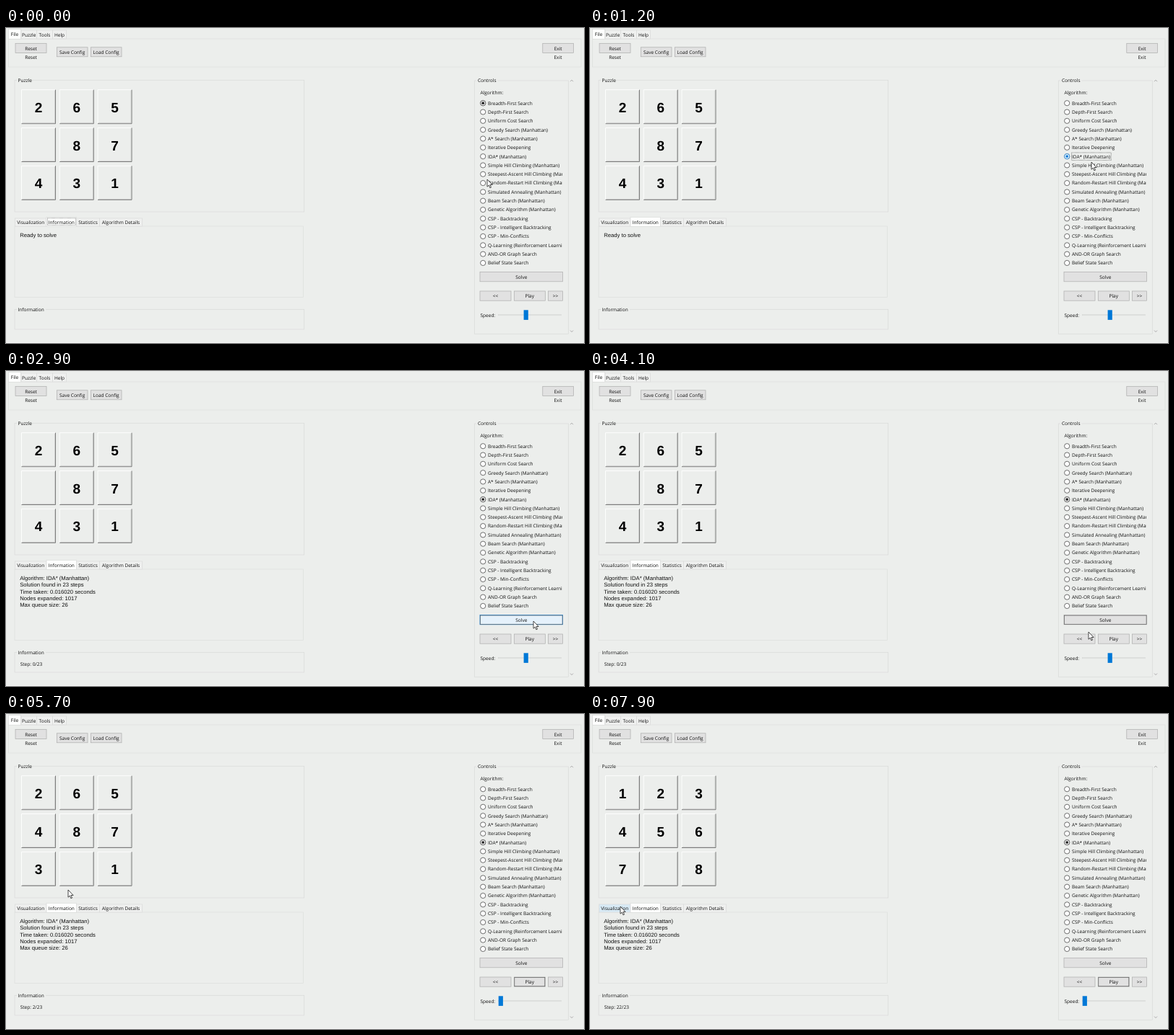
Recreate the animation shown at these times as an HTML page. Size 800 px wide and 437 px high, loop 8 s.

```html
<!DOCTYPE html>
<html lang="en">
<head>
<meta charset="utf-8">
<title>Puzzle solver</title>
<style>
  html, body { margin: 0; width: 100%; height: 100%; overflow: hidden; background: #eceeec; }
  svg { display: block; width: 100vw; height: 100vh; }
  text { font: 6.52px "Open Sans", "Noto Sans", sans-serif; fill: #111; text-rendering: geometricPrecision; white-space: pre; }
  .log { font: 7.68px "Liberation Sans", Arial, sans-serif; }
  .digit { font: bold 19px "Liberation Sans", Arial, sans-serif; fill: #000; }
</style>
</head>
<body>
<svg id="stage" viewBox="0 0 800 437">
  <defs><clipPath id="panel"><rect x="650" y="80" width="120" height="260"/></clipPath></defs>
</svg>
<script>
const LOOP = 8000, TICK = 100;
const SELECT = 1000, SOLVE = 2300, SOLVED = 2400, PLAY = 5400;
const FIRST = 5470, STEP = 108, LAST = 22;
const START = "2650" .slice(0, 3) + "087431";
const MOVES = "4317813413785635632147";   // tile slid into the gap at each step
const ALGORITHMS = [
  "Breadth-First Search", "Depth-First Search", "Uniform Cost Search",
  "Greedy Search (Manhattan)", "A* Search (Manhattan)", "Iterative Deepening",
  "IDA* (Manhattan)", "Simple Hill Climbing (Manhattan)",
  "Steepest-Ascent Hill Climbing (Manhattan)", "Random-Restart Hill Climbing (Manhattan)",
  "Simulated Annealing (Manhattan)", "Beam Search (Manhattan)",
  "Genetic Algorithm (Manhattan)", "CSP - Backtracking",
  "CSP - Intelligent Backtracking", "CSP - Min-Conflicts",
  "Q-Learning (Reinforcement Learning)", "AND-OR Graph Search", "Belief State Search"
];
const RESULT = ["Algorithm: IDA* (Manhattan)", "Solution found in 23 steps",
  "Time taken: 0.016020 seconds", "Nodes expanded: 1017", "Max queue size: 26"];
// time, x, y
const POINTER = [
  [0, 666, 210], [300, 668, 206], [900, 690, 179], [1000, 690, 179], [1200, 694, 186],
  [2000, 730, 347], [3000, 730, 347], [3800, 690, 362], [4100, 690, 362],
  [4400, 719, 396], [4500, 719, 396], [4800, 685, 397], [4900, 685, 397],
  [5200, 724, 370], [5400, 724, 370], [5700, 86, 244], [6100, 86, 244],
  [7000, 80, 282], [7300, 80, 282], [7800, 42, 267], [8000, 42, 267]
];

const stage = document.getElementById("stage");

function add(tag, attrs, parent = stage) {
  const el = document.createElementNS("http://www.w3.org/2000/svg", tag);
  for (const k in attrs) el.setAttribute(k, attrs[k]);
  return parent.appendChild(el);
}
function box(x, y, x2, y2, fill, stroke, width = 0.7) {
  return add("rect", { x, y, width: x2 - x, height: y2 - y, fill, stroke, "stroke-width": width });
}
function label(str, x, mid, anchor = "start", cls = "", drop = 2.4, parent = stage) {
  const el = add("text", { x, y: mid + drop, "text-anchor": anchor, class: cls }, parent);
  el.textContent = str;
  return el;
}
const path = (d, stroke, width = 0.7) => add("path", { d, fill: "none", stroke, "stroke-width": width });
const show = (el, on) => el.setAttribute("visibility", on ? "visible" : "hidden");

function focusRing(x, y, x2, y2) {
  const el = box(x, y, x2, y2, "none", "#444", 0.6);
  el.setAttribute("stroke-dasharray", "0.6 0.5");
  return el;
}
function group(title, x, y, x2, y2, titleWidth) {
  box(x, y, x2, y2, "none", "#d9dbd9");
  box(x + 3, y - 3, x + 5 + titleWidth, y + 3, "#eceeec", "none");
  label(title, x + 4.5, y);
}
function button(str, x, y, x2, y2) {
  const face = box(x, y, x2, y2, "#e1e1e1", "#adadad");
  const ring = box(x + 0.5, y + 0.5, x2 - 0.5, y2 - 0.5, "none", "#5c5c5c", 0.7);
  show(ring, false);
  label(str, (x + x2) / 2, (y + y2) / 2 + 0.2, "middle");
  return {
    focus: on => show(ring, on),
    hover(p) {
      const on = p.x > x && p.x < x2 && p.y > y && p.y < y2;
      face.setAttribute("fill", on ? "#e5f1fb" : "#e1e1e1");
      face.setAttribute("stroke", on ? "#0078d7" : "#adadad");
    }
  };
}
function tab(str, x, y, x2, y2, active) {
  const face = box(x, y, x2, y2, active ? "#fdfefd" : "#eff0ef", "#d9dbd9");
  label(str, (x + x2) / 2, (y + y2) / 2 + (active ? 0.4 : 0.2), "middle");
  return face;
}

// toolbar
box(0, 436, 800, 437, "#f8f9f8", "none");
box(3.5, 15, 796, 54, "none", "#dcdedc");
tab("Puzzle", 21, 3, 42.5, 15);
tab("Tools", 42.5, 3, 64.5, 15);
tab("Help", 64.5, 3, 83.5, 15);
tab("File", 3.5, 1.5, 20.5, 15.3, true);
button("Reset", 13, 21.3, 56, 34.5);
label("Reset", 34.5, 41, "middle");
button("Save Config", 70.3, 26.8, 113, 39.8);
button("Load Config", 117.3, 26.8, 160, 39.8);
button("Exit", 742.8, 21.3, 785.5, 34.5);
label("Exit", 764, 41, "middle");

// puzzle board
group("Puzzle", 12, 72.3, 412.7, 255, 20);
const digits = Array.from({ length: 9 }, (_, i) => {
  const x = 21.5 + 52.75 * (i % 3), y = 85.7 + 52.8 * Math.floor(i / 3), s = 47;
  path(`M${x} ${y + s}V${y}H${x + s}`, "#fff", 0.9);
  path(`M${x} ${y + s}H${x + s}V${y}`, "#6b6b6b", 0.9);
  path(`M${x + 1} ${y + s - 0.8}H${x + s - 0.8}V${y + 1}`, "#b2b2b2", 0.6);
  return label("", x + 23.5, y + 24.2, "middle", "digit", 6.8);
});

// result tabs
box(12, 275, 411.5, 373.3, "none", "#dcdedc");
const visTab = tab("Visualization", 12.5, 264, 56, 275);
tab("Statistics", 97.5, 264, 129.5, 275);
tab("Algorithm Details", 129.5, 264, 188.5, 275);
tab("Information", 56, 262.3, 97.5, 275.4, true);
const tabRing = focusRing(57.5, 263.8, 96.3, 273.6);
const ready = label("Ready to solve", 19.2, 287, "start", "log", 2.8);
const result = RESULT.map((s, i) => label(s, 19.2, 287 + 9.4 * i, "start", "log", 2.8));

group("Information", 12, 390.3, 412.7, 418, 38);
const stepText = label("", 19.7, 407);

// controls
group("Controls", 648.5, 73, 778.3, 424.3, 27);
path("M781 74.2L783 72.2L785 74.2M781 419.6L783 421.6L785 419.6", "#999", 0.8);
label("Algorithm:", 656.5, 90);
const list = add("g", { "clip-path": "url(#panel)" });
const rowY = i => 104.2 + 12.32 * i;
ALGORITHMS.forEach((name, i) => {
  add("circle", { cx: 660.2, cy: rowY(i), r: 3.6, fill: "#fff", stroke: "#404040", "stroke-width": 0.75 });
  label(name, 667, rowY(i), "start", "", 2.4, list);
});
const picked = add("circle", { cx: 660.2, r: 3.6, fill: "#fff", "stroke-width": 0.75 });
const dot = add("circle", { cx: 660.2, r: 1.9 });
const rowRing = focusRing(666.6, 172.9, 721.3, 183.4);

const solve = button("Solve", 656, 338.6, 770.6, 351.8);
const back = button("<<", 656, 365, 699, 378.2);
const play = button("Play", 703.3, 365, 746.3, 378.2);
const next = button(">>", 750.6, 365, 770.6, 378.2);
label("Speed:", 656.5, 398.2);
box(681.5, 397.4, 768.5, 398.8, "#e6e7e6", "#d2d4d2", 0.5);
const thumb = add("rect", { y: 391.3, width: 6.2, height: 13.6, fill: "#0078d7" });

const arrow = add("path", {
  d: "M0 0V10.2L2.3 8.1L3.9 11.8L5.5 11.1L3.9 7.5H7.1Z",
  fill: "#fff", stroke: "#111", "stroke-width": 0.75, "stroke-linejoin": "round"
});

function pointerAt(t) {
  const i = Math.max(1, POINTER.findIndex(p => p[0] >= t));
  const [t0, x0, y0] = POINTER[i - 1], [t1, x1, y1] = POINTER[i];
  const u = (t - t0) / (t1 - t0), e = u * u * (3 - 2 * u);
  return { x: x0 + (x1 - x0) * e, y: y0 + (y1 - y0) * e };
}
function boardAt(step) {
  const board = [...START];
  for (const tile of MOVES.slice(0, step)) {
    const from = board.indexOf(tile), gap = board.indexOf("0");
    board[gap] = tile;
    board[from] = "0";
  }
  return board;
}

function draw(t) {
  const p = pointerAt(t);
  const step = Math.min(LAST, Math.max(0, Math.floor((t - FIRST) / STEP)));
  boardAt(step).forEach((n, i) => digits[i].textContent = n === "0" ? "" : n);

  const done = t >= SOLVED, chosen = t >= SELECT;
  show(ready, !done);
  result.forEach(line => show(line, done));
  stepText.textContent = done ? `Step: ${step}/23` : "";

  const y = rowY(chosen ? 6 : 0), hot = chosen && t < 1400;
  picked.setAttribute("cy", y);
  picked.setAttribute("stroke", hot ? "#0078d7" : "#404040");
  dot.setAttribute("cy", y);
  dot.setAttribute("fill", hot ? "#0078d7" : "#222");
  show(tabRing, !chosen);
  show(rowRing, chosen && t < SOLVE);

  solve.focus(t >= SOLVE && t < PLAY);
  play.focus(t >= PLAY);
  [solve, back, play, next].forEach(b => b.hover(p));
  const overTab = p.x > 12.5 && p.x < 56 && p.y > 264 && p.y < 275;
  visTab.setAttribute("fill", overTab ? "#d8eaf5" : "#eff0ef");

  const thumbX = t < 4500 ? 719.7 : t < 4800 ? p.x : 684.8;
  thumb.setAttribute("x", thumbX - 3.1);
  arrow.setAttribute("transform", `translate(${p.x} ${p.y})`);
}

const origin = performance.now();
function frame() {
  const t = (performance.now() - origin) % LOOP;
  draw(Math.floor(t / TICK) * TICK);
  requestAnimationFrame(frame);
}
frame();
</script>
</body>
</html>
```
